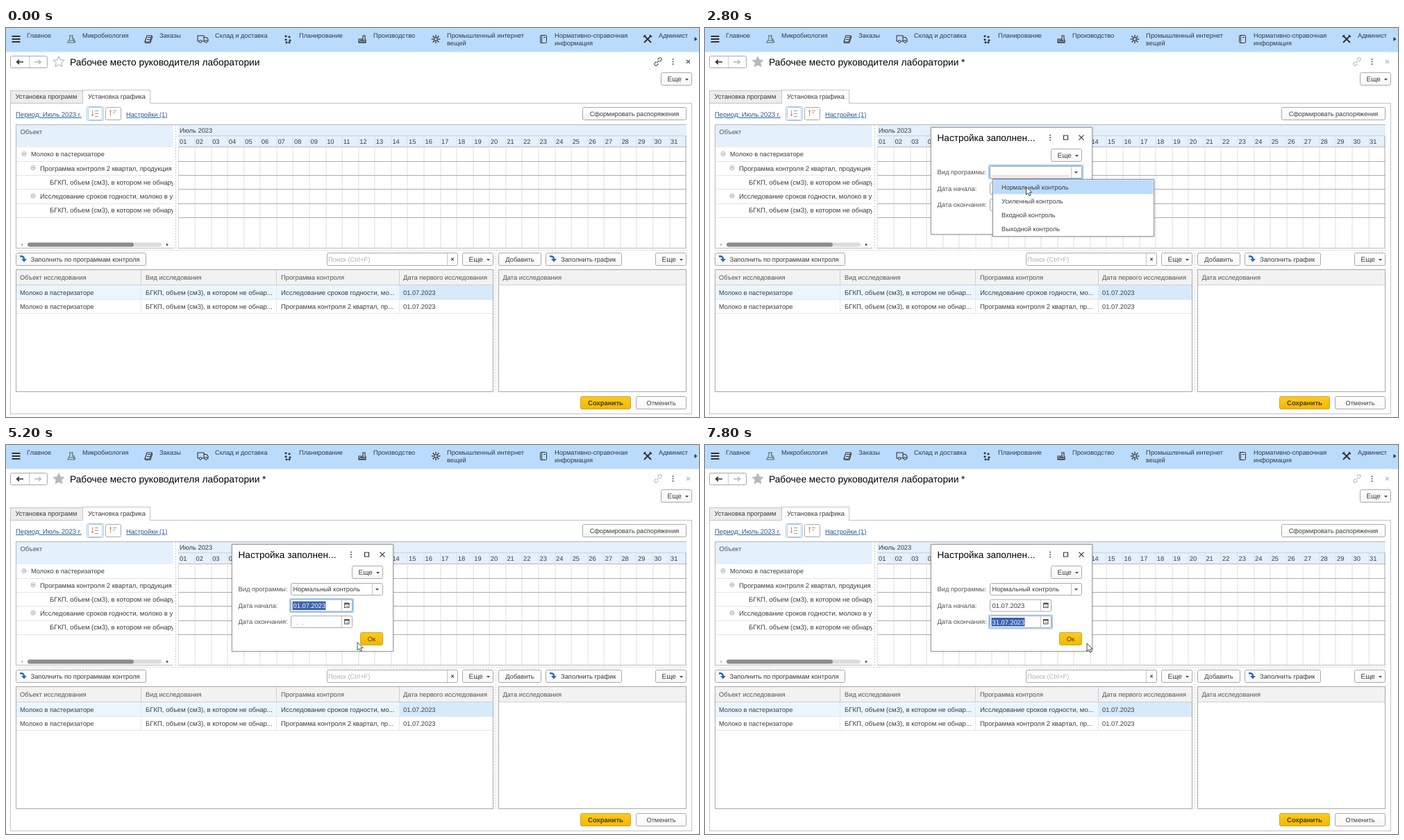
These frames come from a looping animation (998x561 px, 8000 ms). An HTML page:

```html
<!DOCTYPE html>
<html lang="ru">
<head>
<meta charset="utf-8">
<title>Рабочее место</title>
<style>
  html, body { margin: 0; width: 100%; height: 100%; overflow: hidden; background: #fff; }
  svg { display: block; width: 998px; height: 561px; }
  text { font-family: "Liberation Sans", Arial, sans-serif; text-rendering: geometricPrecision; white-space: pre; }
  .dialog { filter: drop-shadow(0 0 1.5px rgba(0, 0, 0, .25)); }
</style>
</head>
<body>
<svg id="stage" viewBox="0 0 998 561"></svg>
<script>
const LINE = '#a9a9a9', SOFT = '#dedede', FOCUS = '#9fcaf2', DARK = '#333', GOLD_TEXT = '#4a3c00';
const TITLE = 13.75, LONG = 9.55;

const rect = (x, y, w, h, fill = 'none', stroke = 'none', r = 0) =>
  `<rect x="${x}" y="${y}" width="${w}" height="${h}" fill="${fill}" stroke="${stroke}" rx="${r}"/>`;
const box = (x0, y0, x1, y1, fill = '#fff', stroke = LINE, r = 0) =>
  rect(x0 + .5, y0 + .5, x1 - x0 - 1, y1 - y0 - 1, fill, stroke, r);
const path = (d, stroke = DARK, width = 1, fill = 'none') =>
  `<path d="${d}" fill="${fill}" stroke="${stroke}" stroke-width="${width}"/>`;
const hline = (x0, x1, y, color = SOFT, extra = '') =>
  `<path d="M${x0} ${y + .5}H${x1}" stroke="${color}" ${extra}/>`;
const vline = (x, y0, y1, color = SOFT, extra = '') =>
  `<path d="M${x + .5} ${y0}V${y1}" stroke="${color}" ${extra}/>`;
// y is the visual middle of the line of text
const text = (x, y, str, { size = 9.35, color = '#3c3c3c', anchor = 'start', bold, extra = '' } = {}) =>
  `<text x="${x}" y="${y + size * .36}" text-anchor="${anchor}" ${extra}
    style="font-size:${size}px;fill:${color};font-weight:${bold ? 700 : 400}">${str}</text>`;
const group = (id, body, attrs = '') => `<g id="${id}" ${attrs}>${body}</g>`;
const at = (x, y, body) => `<g transform="translate(${x} ${y})">${body}</g>`;

const caret = (x, y) => path(`M${x - 2.5} ${y - 1}h5l-2.5 2.7z`, 'none', 0, '#444');
const cross = (x, y, s = 3.5, color = '#444') =>
  path(`M${x - s} ${y - s}l${2 * s} ${2 * s}M${x + s} ${y - s}l${-2 * s} ${2 * s}`, color, 1.1);
const dots = (x, y, color = '#444') => [-3.5, 0, 3.5].map(d => rect(x - .8, y + d - .8, 1.7, 1.7, color)).join('');
const button = (x0, y0, x1, y1, label, opts = {}) =>
  box(x0, y0, x1, y1, opts.yellow ? 'url(#gold)' : 'url(#plain)', opts.yellow ? '#cfa620' : LINE, 2) +
  text(opts.x ?? (x0 + x1) / 2, (y0 + y1) / 2 + .2, label, { anchor: opts.x ? 'start' : 'middle', ...opts });
const moreButton = (x0, y0, x1) =>
  button(x0, y0, x1, y0 + 19, 'Еще', { x: x0 + 9.5, size: 10 }) + caret(x1 - 7.5, y0 + 10);
const fillArrow = (x, y) =>
  path(`M${x} ${y - 3.5}c4-1 6 1 6 4`, '#2b6cb0', 2.4) + path(`M${x + 2} ${y}h8l-4 4.5z`, 'none', 0, '#2b6cb0');
const windowControls = (x, y) =>
  dots(x, y) + path(`M${x + 19.5} ${y - 3}h6v6h-6z`, DARK, 1.2) + cross(x + 45, y);

function topMenu() {
  const entries = [[30, 'Главное'], [110, 'Микробиология'], [221, 'Заказы'], [301, 'Склад и доставка'],
    [422, 'Планирование'], [529, 'Производство'], [635, 'Промышленный интернет', 'вещей'],
    [790, 'Нормативно-справочная', 'информация'], [940, 'Админист']];
  const opts = { size: 9.22, color: '#2f3a45' };
  const spokes = Array.from({ length: 8 }, (_, i) =>
    `<path d="M0-2.5V-6.3" stroke="${DARK}" stroke-width="1.3" transform="rotate(${i * 45})"/>`).join('');
  const wheel = x => `<circle cx="${x}" cy="3.5" r="1.8" fill="#badbfc" stroke="${DARK}"/>`;
  return rect(0, 0, 998, 34.5, '#badbfc') +
    [11, 15, 19].map(y => rect(8.5, y, 12, 2, DARK)).join('') +
    entries.map(([x, ...rows]) => rows.map((s, i) => text(x, 11 + i * 11, s, opts)).join('')).join('') +
    at(94, 16, path('M-2-5V-1L-5.5 5H5L1.5-1V-5M-3-5H3M-4 2H3M3-2l3 7', '#566')) +
    at(205, 16, path('M-2-5L5-5 2 4-5 4z', DARK, 1.2) + path('M-5 4q0 2 2 1.5L3 5.5 6-4M-1-2.5h4M-2 .5h4')) +
    at(283, 16, path('M-7-5H2V3H-7zM2-2.5H6L8 .5V3H2', DARK, 1.1) + wheel(-3) + wheel(5)) +
    at(406, 16, [[-4, -5], [1, -4], [-4, 0], [2, 1], [-3, 4], [1, 4]]
      .map(([x, y]) => rect(x - .5, y - .5, 3, 2.8, DARK, 'none', 1)).join('')) +
    at(513, 16, path('M-5 5V0H1V-5H4V1H5V5z', DARK, 1.1) + path('M-5 3H5M-5 5H5M-3 1.5H3', DARK, 1.2)) +
    at(619, 16, spokes + `<circle r="2.3" fill="none" stroke="${DARK}"/>`) +
    at(774, 16, rect(-4.5, -5.5, 9, 11, 'none', DARK, 1) + path('M-2.5-5.5V5.5M0-2.5H3')) +
    at(924, 16, path('M-5-5L5 5M5-5L-5 5', DARK, 2) + path('M-6-3l3-3M3-6l3 3', DARK, 1.6)) +
    rect(985, 0, 13, 34.5, '#badbfc') + path('M991.5 13l4 3-4 3z', 'none', 0, DARK);
}

function header() {
  const star = 'M76 41l2.3 5 5.5.6-4.1 3.7 1.2 5.4-4.9-2.8-4.9 2.8 1.2-5.4-4.1-3.7 5.5-.6z';
  const link = path('M-1 1.5l3-3M0-3l2-2c2-2 5 1 3 3l-2 2M1 3l-2 2c-2 2-5-1-3-3l2-2', 'currentColor', 1.1);
  const tools = color => `<g color="${color}">${at(938.5, 48.5, link)}</g>` + cross(982.5, 48.5, 2.5, color);
  const title = { size: TITLE, color: '#000' };
  return box(6, 40, 60, 58, '#fff', LINE, 2) + vline(33, 41, 57, '#ccc') +
    path('M25 49H16M19 46l-3.3 3 3.3 3', DARK, 1.7) + path('M41 49h9M47 46l3.3 3-3.3 3', '#b5b5b5', 1.4) +
    text(92, 49, 'Рабочее место руководителя лаборатории', title) +
    group('clean', path(star, '#aaa') + tools('#555')) +
    group('dirty', path(star, '#b8b8b8', 1, '#b8b8b8') + text(369, 49, '*', title) + tools('#bbb')) +
    dots(960.5, 48.5) + moreButton(943, 64, 988);
}

function planner() {
  const pitch = 23.57, x0 = 248.5;
  const rows = [[36, 'Молоко в пастеризаторе', 1], [49, 'Программа контроля 2 квартал, продукция из', 1],
    [63, 'БГКП, объем (см3), в котором не обнаружено'],
    [49, 'Исследование сроков годности, молоко в упаковке', 1], [63, 'БГКП, объем (см3), в котором не обнаружено']];
  const link = { color: '#2a5594', extra: 'text-decoration="underline"' };
  let s = box(6, 108, 988, 557, '#fff', '#c4c4c4') +
    box(6, 90, 111, 109, '#ededed', '#c4c4c4') + box(110, 89, 208, 109, '#fff', '#c4c4c4') + rect(111, 107, 96, 3, '#fff') +
    text(13.5, 98.8, 'Установка программ') + text(118, 98.8, 'Установка графика') +
    text(14, 124.5, 'Период: Июль 2023 г.', { ...link, size: LONG }) + text(173, 124.5, 'Настройки (1)', { ...link, size: 9.25 }) +
    box(116, 113, 141, 134, '#fff', FOCUS, 2) + box(118, 114, 139, 133, '#fff', '#b4c6d6', 2) + box(143, 114, 166, 133, '#fff', LINE, 2) +
    path('M124.5 118.5v8M123 125l1.5 2 1.5-2', '#e08a60') + path('M128 119.5h5M128 123.5h5M128 127.5h5', '#999') +
    path('M150.5 127v-8M149 120.5l1.5-2 1.5 2', '#e08a60') + path('M154 119.5h5M154 122.5h3', '#999') +
    button(830, 114, 980, 133, 'Сформировать распоряжения', { size: 9.2 });

  s += box(14, 139, 241, 318, '#fff', '#b8b8b8') + rect(240, 140, 8, 177, '#fff') +
    rect(15, 140, 225.5, 32, '#e4f0fc') + text(20.5, 150, 'Объект', { color: '#555' }) +
    rect(248, 139, 732, 33, '#e4f0fc') + hline(248, 980, 155, '#c9d3dc') + hline(14, 980, 139, '#b8b8b8') +
    text(250, 148, 'Июль 2023') + hline(248, 980, 171, '#b8b8b8');
  for (let d = 0; d < 31; d++) {
    s += text(250 + d * pitch, 164, String(d + 1).padStart(2, '0')) +
      vline(Math.round(x0 + (d + 1) * pitch) - .5, 156, 317, d < 30 ? SOFT : LINE);
  }
  s += vline(248, 172, 317) + hline(248, 980, 317, '#b8b8b8') +
    vline(244, 140, 318, '#c4c4c4', 'stroke-dasharray="2 2"');
  rows.forEach(([x, label, parent], i) => {
    const y = 182 + i * 20.2, edge = Math.round(y + 10);
    s += hline(15, 240, edge, '#e4e4e4') + hline(248, 980, edge, '#adadad') +
      `<g clip-path="url(#tree)">${text(x, y, label, { size: i ? LONG : 9.25 })}</g>`;
    if (parent) s += `<circle cx="${x - 10}" cy="${y - .5}" r="3" fill="#fff" stroke="#aaa"/>` + path(`M${x - 11.5} ${y - .5}h3`, '#777');
  });
  return s + rect(31, 309.5, 193, 6, '#dcdcdc', 'none', 3) + rect(31, 309.5, 153, 6, '#8c8c8c', 'none', 3) +
    path('M24 310.5v4l-2.5-2z', 'none', 0, '#aaa') + path('M231 310.5v4l3-2z', 'none', 0, '#444') +
    hline(14, 980, 320, '#cfcfcf', 'stroke-dasharray="2 2"') + vline(705, 324, 525, '#cfcfcf', 'stroke-dasharray="2 2"');
}

function tables() {
  const columns = [[20, 'Объект исследования'], [201, 'Вид исследования'], [396, 'Программа контроля'], [572, 'Дата первого исследования']];
  const kinds = ['Исследование сроков годности, мо...', 'Программа контроля 2 квартал, пр...'];
  const head = { color: '#555' };
  return button(14, 324, 202, 343, 'Заполнить по программам контроля', { x: 35.5 }) + fillArrow(20, 333) +
    box(462, 324, 651, 343, '#fff', LINE, 2) + vline(635, 325, 342, '#c4c4c4') +
    text(464, 333.5, 'Поиск (Ctrl+F)', { color: '#b0b0b0' }) + cross(643, 333.5, 1.8) +
    moreButton(657, 324, 702) + button(709, 324, 771, 343, 'Добавить') +
    button(777, 324, 887, 343, 'Заполнить график', { x: 799 }) + fillArrow(783, 333) + moreButton(935, 324, 980) +
    box(14, 348, 702, 525) + box(709, 348, 980, 525) +
    rect(15, 349, 686, 21, '#f2f2f2') + rect(710, 349, 269, 21, '#f2f2f2') +
    hline(15, 701, 370, '#d0d0d0') + hline(710, 979, 370, '#d0d0d0') +
    rect(15, 371, 686, 20, '#ebf5fe') + rect(567, 371, 134, 20, '#d7eafc') +
    [194, 389, 566].map(x => vline(x, 349, 370, '#cfcfcf') + vline(x, 371, 411, '#e8e8e8')).join('') +
    hline(15, 701, 391, '#e6e6e6') + hline(15, 701, 411, '#e6e6e6') +
    columns.map(([x, s]) => text(x, 359.7, s, head)).join('') + text(715.5, 359.7, 'Дата исследования', head) +
    kinds.map((kind, i) => ['Молоко в пастеризаторе', 'БГКП, объем (см3), в котором не обнар...', kind, '01.07.2023']
      .map((s, c) => text(columns[c][0], 381.2 + i * 20.3, s, { size: c % 3 ? LONG : 9.3 })).join('')).join('') +
    button(827, 531, 900, 550, 'Сохранить', { yellow: true, bold: true, size: 9.5, color: GOLD_TEXT }) +
    button(907, 531, 980, 550, 'Отменить', { size: 9.2 });
}

function settingsDialog() {
  const label = (y, s) => text(334.5, y, s, { color: '#555' });
  const underline = (x1, y) => hline(413, x1, y, '#e08a8a', 'stroke-dasharray="1.5 .7"');
  const halo = (id, y, x1) => group(id, box(408, y, x1, y + 21, 'none', FOCUS, 1) + box(409, y + 1, x1 - 1, y + 20, '#fff', FOCUS));
  const dateField = (id, y, value, required) => halo(id + 'Focus', y - 10.5, 501) +
    box(410, y - 9, 499, y + 9, '#fff', LINE, 2) + vline(483, y - 8, y + 8, '#c4c4c4') +
    rect(487.5, y - 3, 6.5, 6, '#fff', '#555') + rect(487, y - 4, 7.5, 2.5, '#555') + path(`M489 ${y + 1}h4`, '#888') +
    group(id + 'Empty', text(418.5, y + .5, '.  .', { color: '#777' }) + (required ? underline(481, y + 6) : '')) +
    group(id + 'Value', text(413.5, y + .3, value)) +
    group(id + 'Marked', rect(412.5, y - 6, 48, 12.5, '#3a62b4') + text(413.5, y + .3, value, { color: '#fff' }));
  return group('settings', box(325, 143, 558, 298, '#fff', '#a0a0a0') +
    text(334.5, 158.5, 'Настройка заполнен...', { size: 13.6, color: '#000', extra: 'id="settingsTitle"' }) +
    windowControls(497, 158) + moreButton(498, 174, 543) +
    label(208, 'Вид программы:') + label(231.5, 'Дата начала:') + label(255, 'Дата окончания:') +
    halo('kindFocus', 197, 545) + box(410, 199, 543, 217, '#fff', LINE, 2) + vline(527, 200, 216, '#c4c4c4') + caret(534.5, 208) +
    group('kindEmpty', underline(525, 213)) + group('kindCaret', path('M414 202.5V214', '#000', 1.2)) +
    group('kindValue', text(413.5, 208, 'Нормальный контроль', { size: 9.2 })) +
    dateField('from', 231.5, '01.07.2023', true) + dateField('till', 255, '31.07.2023') +
    button(510, 270, 543, 289, 'Ок', { yellow: true, color: GOLD_TEXT }) +
    group('okHover', box(510, 270, 543, 289, '#ffe069', '#cfa620', 2) +
      text(526.5, 279.7, 'Ок', { anchor: 'middle', color: GOLD_TEXT })), 'class="dialog"');
}

function dropdown() {
  const items = ['Нормальный контроль', 'Усиленный контроль', 'Входной контроль', 'Выходной контроль'];
  return group('dropdown', box(414, 218, 647, 301, '#fff', '#8f979e') + rect(415.5, 219.5, 230, 20, '#badbfc') +
    items.map((s, i) => text(427, 229.5 + i * 20.15, s, { size: 9.2 })).join(''), 'class="dialog"');
}

function dateDialog() {
  const X = 277, Y = 224.5, W = 25.45, H = 21.6, RED = '#d0480f', GRID = '#dcdcdc';
  const left = c => Math.round(X + c * W), top = r => Math.round(Y + r * H);
  const center = (c, r, s, color) => text(X + (c + .5) * W - .7, Y + (r + .5) * H, s, { anchor: 'middle', size: 9.3, color });
  const tint = c => c > 4 ? RED : '#3c3c3c';
  const cell = (c, r, fill) => box(left(c), top(r), left(c + 1) + 1, top(r + 1) + 1, fill, FOCUS);
  const pressed = (c, r, day) => cell(c, r, '#d4eafc') +
    rect(left(c) + 2, top(r) + 2, left(c + 1) - left(c) - 3, top(r + 1) - top(r) - 3, '#5a5a5a') + center(c, r, day, '#2e2e2e');
  let s = '';
  for (let r = 0; r <= 8; r++) s += hline(left(0), left(7) + 1, top(r), GRID);
  for (let c = 0; c <= 7; c++) {
    s += vline(left(c), top(2), top(8), GRID);
    if (![1, 3, 4].includes(c)) s += vline(left(c), top(0), top(1), GRID);
  }
  s += vline(left(0), top(1), top(2), GRID) + vline(left(7), top(1), top(2), GRID) +
    text(283, 235.5, '2023', { size: 9.2 }) + text(334.5, 235.5, 'Июль', { size: 9.2 });
  'Пн Вт Ср Чт Пт Сб Вс'.split(' ').forEach((day, c) => s += center(c, 1, day, tint(c)));
  s += group('today', cell(3, 5, '#fff'));
  for (let d = 1; d <= 31; d++) s += center((d + 4) % 7, 2 + Math.floor((d + 4) / 7), d, tint((d + 4) % 7));
  s += group('pickFirst', pressed(5, 2, 1)) + group('pickLast', pressed(0, 7, 31));
  const title = (id, str) => group(id, text(257, 183, str, { size: 13.6, color: '#000' }));
  return group('calendar', box(247, 167, 672, 439, '#fff', '#a0a0a0') +
    title('titleFrom', 'Выберите дату начала') + title('titleTill', 'Выберите дату окончания') +
    windowControls(612, 183) + box(257, 216, 658, 405) + s +
    button(536, 411, 570, 430, 'ОК', { yellow: true, bold: true, color: GOLD_TEXT }) +
    button(576, 411, 630, 430, 'Отмена', { size: 9.2 }) + button(636, 411, 658, 430, '?', { bold: true, size: 10 }), 'class="dialog"');
}

const gradient = (id, a, b) => `<linearGradient id="${id}" x2="0" y2="1"><stop stop-color="${a}"/><stop offset="1" stop-color="${b}"/></linearGradient>`;
const stage = document.getElementById('stage');
stage.innerHTML = `<defs>${gradient('gold', '#fdca22', '#f2b705')}${gradient('plain', '#fff', '#f7f7f7')}
  <clipPath id="tree"><rect x="15" y="140" width="225.5" height="178"/></clipPath></defs>` +
  topMenu() + header() + planner() + tables() + settingsDialog() + dropdown() + dateDialog() +
  group('pointer', path('M0 0V11.3L2.6 9 4.5 13 6.5 12.1 4.7 8.2H8.2z', '#333', .9, '#fff'));

const LOOP = 8000, STEP = 200;
// pointer waypoints: time, x, y
const route = [[400, 25, 338], [800, 60, 336], [1000, 90, 335], [1400, 179, 335], [1600, 319.5, 301], [2000, 533, 206],
  [2200, 533, 206], [2800, 462.5, 229], [3000, 462.5, 229], [3400, 490, 231], [3600, 490, 231], [4000, 413, 276.5],
  [4400, 413, 276.5], [4800, 552, 417], [5000, 552, 418], [5200, 506, 284.5], [5400, 490, 255], [5600, 490, 256],
  [5800, 475, 279.5], [6200, 290, 383], [6400, 290, 383], [7000, 552, 420], [7400, 552, 420], [7600, 530, 279], [7800, 550, 286]];
// layers and the spans [from, to) in which they are visible
const spans = {
  clean: [0, 1000], dirty: [1000, LOOP], settings: [1000, LOOP], pointer: [400, LOOP],
  kindFocus: [1000, 3600], kindEmpty: [1000, 3000], kindCaret: [1000, 2200], kindValue: [3000, LOOP], dropdown: [2200, 3000],
  fromFocus: [3600, 5600], fromEmpty: [1000, 5200], fromMarked: [5200, 5600], fromValue: [5600, LOOP],
  tillFocus: [5600, LOOP], tillEmpty: [1000, 7400], tillMarked: [7400, LOOP], tillValue: [LOOP, LOOP],
  calendar: [3600, 5200, 5600, 7400], titleFrom: [3600, 5200], titleTill: [5600, 7400],
  today: [3600, 4200, 5600, 6400], pickFirst: [4200, 5200], pickLast: [6400, 7400], okHover: [7600, 7800]
};
const layers = Object.keys(spans).map(id => [document.getElementById(id), spans[id]]);
const within = (s, t) => s.some((from, i) => i % 2 === 0 && t >= from && t < s[i + 1]);
const pointer = document.getElementById('pointer'), settingsTitle = document.getElementById('settingsTitle');

function pointerAt(t) {
  const i = route.findIndex(p => p[0] > t);
  if (i < 1) return route[i < 0 ? route.length - 1 : 0].slice(1);
  const [t0, x0, y0] = route[i - 1], [t1, x1, y1] = route[i], k = (t - t0) / (t1 - t0);
  return [x0 + (x1 - x0) * k, y0 + (y1 - y0) * k];
}

const start = performance.now();
function draw() {
  const t = Math.floor((performance.now() - start) % LOOP / STEP) * STEP;
  for (const [el, s] of layers) el.style.display = within(s, t) ? '' : 'none';
  settingsTitle.style.fill = within(spans.calendar, t) ? '#777' : '#000';
  pointer.setAttribute('transform', `translate(${pointerAt(t).join(' ')})`);
  requestAnimationFrame(draw);
}
draw();
</script>
</body>
</html>
```
